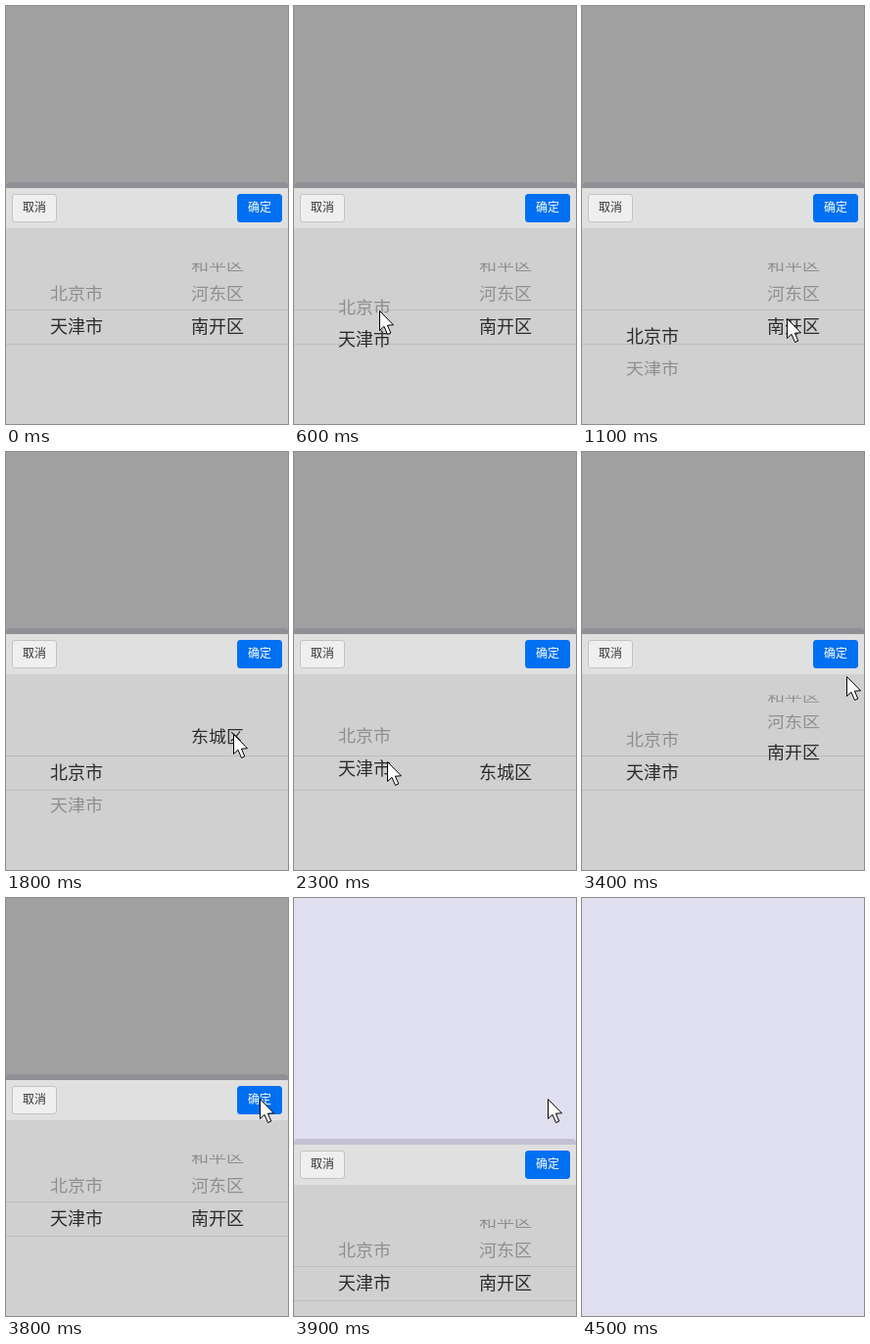
Animation, 288 px wide and 427 px high, one loop 5 s. Source, as an HTML page:

```html
<!DOCTYPE html>
<html lang="zh-CN">
<head>
<meta charset="utf-8">
<title>Picker</title>
<style>
html, body { margin: 0; width: 100%; height: 100%; overflow: hidden; background: #e0dfef; }
body { position: relative; font-family: "Noto Sans CJK SC", "Noto Sans CJK JP", "Noto Sans CJK", sans-serif; }
#mask { position: absolute; inset: 0; background: #a0a0a0; }
#panel { position: absolute; left: 0; top: 180px; width: 288px; height: 247px; }
#shade { height: 6px; background: rgba(89, 84, 115, .22); border-radius: 4px 4px 0 0; }
#head { position: absolute; top: 6px; width: 100%; height: 41px; background: #e0e0e0; }
#body { position: absolute; top: 47px; width: 100%; height: 200px; background: #d0d0d0; }
.btn { position: absolute; top: 6px; width: 46px; height: 29px; box-sizing: border-box; border: 1px solid #c3c3c3;
  border-radius: 3px; background: #efefef; color: #333; font-size: 12px; line-height: 24px; text-align: center; }
#ok { left: 236px; background: #0070f2; border-color: #0070f2; color: #fff; }
#no { left: 6px; }
#rule { position: absolute; top: 83px; width: 100%; height: 34px; border: solid #bcbcbc; border-width: 1px 0; }
.item { position: absolute; top: 83px; width: 144px; height: 36px; font-size: 18px; text-align: center; color: #8e8e8e; }
.item span { display: block; line-height: 33px; }
.item.on { color: #2c2c2c; }
#cursor { position: absolute; left: 0; top: 0; overflow: visible; }
</style>
</head>
<body>
<div id="mask"></div>
<div id="panel">
  <div id="shade"></div>
  <div id="head"><div class="btn" id="no">取消</div><div class="btn" id="ok">确定</div></div>
  <div id="body"><div id="rule"></div></div>
</div>
<svg id="cursor" width="16" height="26">
  <path d="M.5 .5V20.5L5 16.3L8.5 24.5L11.8 23L8.4 15.2L14.5 14.8Z" fill="#fff" stroke="#000"/>
</svg>
<script>
const LOOP = 5000, STEP = 100;
const RADIUS = 97, ANGLE = Math.PI / 9;
const $ = id => document.getElementById(id);

const clamp = (v, lo, hi) => Math.max(lo, Math.min(hi, v));
const easeOut = p => 1 - (1 - p) ** 2;
const smooth = p => p * p * (3 - 2 * p);
const tween = (t, start, span, from, to, ease = easeOut) =>
  from + (to - from) * ease(clamp((t - start) / span, 0, 1));

// Drag a wheel past its end, pause, then spring back to the end row
function swing(t, start, span, from, over, to) {
  const back = start + span + 100;
  return t < back ? tween(t, start, span, from, over) : tween(t, back, 200, over, to);
}

const cityPos = t => t < 2000 ? swing(t, 500, 600, 1, -.3, 0) : swing(t, 2100, 400, 0, 1.5, 1);
const tianjinPos = t => t < 2000 ? 2 : swing(t, 2900, 500, 0, 2.62, 2);
const beijingPos = t => swing(t, 1700, 100, 0, 1.115, 0);

// Stops of the pointer: time, x, y
const stops = [
  [200, 277, 335], [500, 88, 300], [800, 83, 341], [1100, 209, 319], [1400, 232, 328],
  [1700, 232, 328], [1800, 232, 288], [2100, 80, 356], [2400, 100, 302], [2700, 224, 331],
  [2900, 225, 344], [3400, 270, 229], [3700, 259, 205], [4000, 259, 205], [4200, 281, 204]
];

function pointer(t) {
  const n = clamp(stops.findLastIndex(s => s[0] <= t), 0, stops.length - 2);
  const [a, b] = [stops[n], stops[n + 1]];
  return [1, 2].map(i => Math.round(tween(t, a[0], b[0] - a[0], a[i], b[i], smooth)));
}

function makeWheel(left, names) {
  const items = names.map(name => {
    const el = document.createElement("div");
    el.className = "item";
    el.style.left = left + "px";
    el.innerHTML = "<span>" + name + "</span>";
    $("body").append(el);
    return el;
  });
  return (pos, shown = true) => {
    const sel = clamp(Math.round(pos), 0, items.length - 1);
    items.forEach((el, i) => {
      const a = (i - pos) * ANGLE, far = i - sel;
      el.classList.toggle("on", i === sel);
      el.style.transform = `translateY(${RADIUS * Math.sin(a)}px) scaleY(${Math.cos(a)})`;
      // Outer rows lose the edge that turns away
      el.style.clipPath = far < -1 ? "inset(13.5px 0 0)" : far > 1 ? "inset(0 0 13.5px)" : "none";
      show(el, shown);
    });
  };
}

const show = (el, on) => { el.style.display = on ? "" : "none"; };

const city = makeWheel(0, ["北京市", "天津市"]);
const tianjin = makeWheel(144, ["和平区", "河东区", "南开区"]);
const beijing = makeWheel(144, ["东城区"]);

function draw(time) {
  const t = Math.floor((time % LOOP) / STEP) * STEP;
  const inBeijing = t >= 1300 && t < 2700;
  const [x, y] = pointer(t);
  city(cityPos(t));
  tianjin(tianjinPos(t), !inBeijing);
  beijing(beijingPos(t), inBeijing);
  $("cursor").style.transform = `translate(${x}px, ${y}px)`;
  show($("cursor"), t >= 100 && t < 4500);
  show($("mask"), t < 3900);
  $("panel").style.transform = `translateY(${Math.round(tween(t, 3857, 300, 0, 247))}px)`;
  show($("panel"), t < 4200);
}

const start = performance.now();
function tick() {
  draw(performance.now() - start);
  requestAnimationFrame(tick);
}
tick();
</script>
</body>
</html>
```
